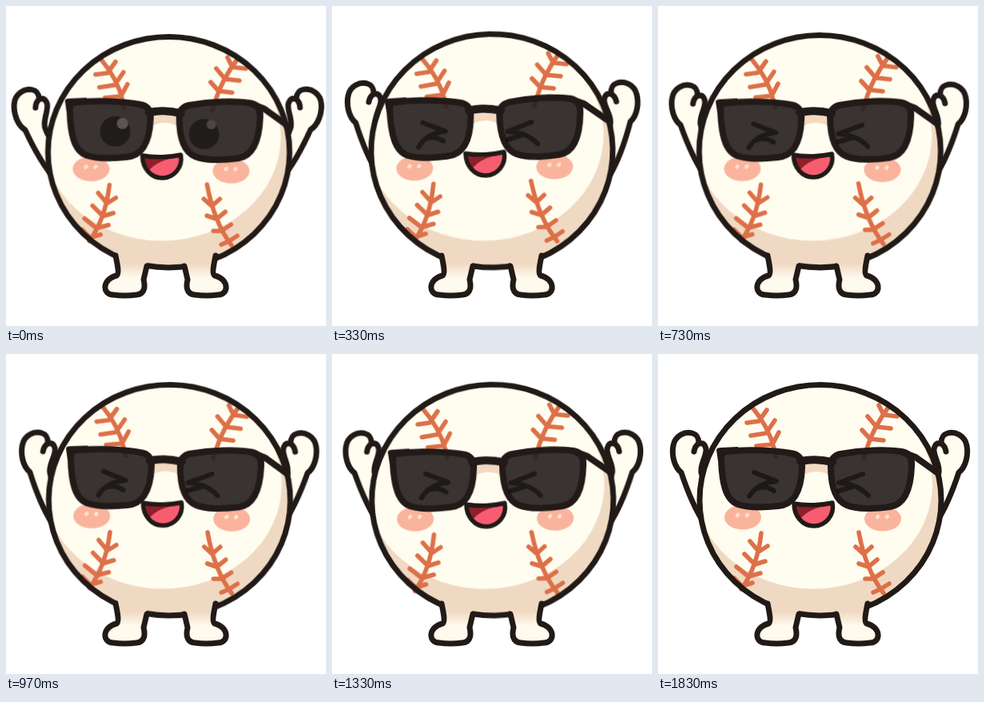
Animation of 400x400 px, one loop 1.86 s. Source, as an HTML page:

```html
<!DOCTYPE html>
<html lang="en">
<head>
<meta charset="utf-8">
<title>Baseball cheer</title>
<style>
  html, body { margin: 0; width: 100%; height: 100%; overflow: hidden; background: #fff; }
  svg { display: block; width: 100%; height: 100%; }

  .ink { stroke: #211a17; stroke-width: 7; stroke-linecap: round; stroke-linejoin: round; }
  .line { fill: none; }
  .skin { fill: #fffcf0; }
  .seam { fill: none; stroke: #dd7049; stroke-width: 5.6; stroke-linecap: round; stroke-linejoin: round; }
  .lens { fill: rgba(38, 31, 30, .91); stroke: #211a18; stroke-width: 8; stroke-linejoin: round; }
  .frame { fill: #211a18; }
  .rod { fill: none; stroke: #211a18; stroke-linejoin: round; stroke-linecap: round; }
  .squint { fill: none; stroke: #000; stroke-width: 6; stroke-linecap: round; stroke-linejoin: round; }

  .move { animation: 1860ms ease-in-out infinite; }
  .head { transform-origin: 200px 320px; animation-name: sway; }
  .ball { transform-origin: 200px 327px; animation-name: stretch; }
  .face { animation-name: bob; }
  .shades { transform-origin: 200px 155px; animation-name: slip; }
  .arm { transform-origin: 60px 195px; }
  .left { animation-name: wave-left; }
  .right { animation-name: wave-right; }
  .open { animation-name: open; animation-timing-function: step-end; }
  .shut { animation-name: shut; animation-timing-function: step-end; }

  /* two sways per loop */
  @keyframes sway {
    0% { transform: rotate(.2deg); }
    25.3% { transform: rotate(-1.6deg); }
    50% { transform: rotate(.6deg); }
    75% { transform: rotate(-1deg); }
    98.4%, 100% { transform: rotate(0deg); }
  }
  /* four bounces per loop, dying down */
  @keyframes stretch {
    0% { transform: scaleY(1); }
    11% { transform: scaleY(1.025); }
    25% { transform: scaleY(.997); }
    37.5% { transform: scaleY(1.007); }
    50% { transform: scaleY(1); }
    62.5% { transform: scaleY(1.005); }
    75% { transform: scaleY(1); }
    87.5% { transform: scaleY(1.002); }
    100% { transform: scaleY(1); }
  }
  @keyframes bob {
    0% { transform: translateY(0); }
    11% { transform: translateY(-8px); }
    25% { transform: translateY(2px); }
    37.5% { transform: translateY(-1px); }
    50% { transform: translateY(-.5px); }
    62.5% { transform: translateY(-1.5px); }
    75% { transform: translateY(1px); }
    87.5% { transform: translateY(-.5px); }
    100% { transform: translateY(0); }
  }
  @keyframes slip {
    0% { transform: translate(0, -1px); }
    11% { transform: translate(-5px, -1px) scaleY(1.02); }
    25%, 100% { transform: none; }
  }
  @keyframes wave-left {
    0% { transform: translateY(3px) rotate(-6.5deg); }
    11% { transform: translateY(-3px) rotate(4.2deg); }
    26% { transform: rotate(-4deg); }
    50% { transform: rotate(1deg); }
    80% { transform: rotate(-1.5deg); }
    100% { transform: rotate(0deg); }
  }
  @keyframes wave-right {
    0% { transform: translateY(3px) rotate(-6deg); }
    11% { transform: translateY(-3px) rotate(6.5deg); }
    26% { transform: rotate(-.5deg); }
    38% { transform: rotate(1deg); }
    50% { transform: rotate(-1.2deg); }
    73% { transform: rotate(.8deg); }
    100% { transform: rotate(0deg); }
  }
  @keyframes open { 0% { opacity: 1; } 5.4%, 100% { opacity: 0; } }
  @keyframes shut { 0% { opacity: 0; } 5.4%, 100% { opacity: 1; } }
</style>
</head>
<body>
<svg viewBox="0 0 400 400">
  <defs>
    <clipPath id="round"><ellipse cx="203" cy="182.7" rx="151" ry="144.2"/></clipPath>
    <linearGradient id="calf" gradientUnits="userSpaceOnUse" x1="0" y1="306" x2="0" y2="346">
      <stop offset=".4" stop-color="#f0d9c2"/>
      <stop offset=".85" stop-color="#fffaee"/>
    </linearGradient>
    <g id="arm">
      <path class="ink skin" d="M58 212C48 197 37 172 29 148C20 141 17 126 19 115C21 102 34 96 43 99C50 101 51 106 51 112C58 110 62 117 59 126C57 134 53 140 54 148C56 158 60 166 66 172"/>
      <path class="ink line" d="M51 112Q46 115 45 122"/>
    </g>
    <g id="leg">
      <path fill="url(#calf)" d="M140 306V318C140 327 142 335 138 337C121 341 119 360 134 361Q148 363 163 361C174 360 174 350 172 342L176 322V306Z"/>
      <path class="ink line" d="M137 312C139 322 142 335 138 337C121 341 119 360 134 361Q148 363 163 361C174 360 174 350 172 342L176 325"/>
    </g>
    <g id="cheek">
      <ellipse rx="23" ry="15.5" fill="#fab49d"/>
      <path d="M-6-3l-1 1M6-3l-1 1" stroke="#ffe3d3" stroke-width="4.5" stroke-linecap="round"/>
    </g>
  </defs>

  <use href="#arm" class="move arm left"/>
  <g transform="matrix(-1 0 0 1 405 0)"><use href="#arm" class="move arm right"/></g>

  <g class="move head">
    <g class="move ball">
      <g clip-path="url(#round)">
        <rect x="40" y="30" width="330" height="300" fill="#f0d9c2"/>
        <ellipse cx="194" cy="163" rx="149" ry="130.5" fill="#fffdf0"/>
      </g>
    </g>

    <g class="move face">
      <g class="seam">
        <path d="M118 67C129 80 140 98 145 118L147 128M111 86L126 84L136 70M116 102L135 99L146 83M123 115L143 113L151 98"/>
        <path d="M289 65C278 80 267 98 261 118L257 130M276 64L282 76L299 78M262 78L273 91L291 93M255 95L265 106L282 108"/>
        <path d="M129 224C126 250 118 275 104 294M115 234L126 247L137 240M108 250L121 263L134 259M98 266L113 278L128 274M95 280L105 290L118 286"/>
        <path d="M251 223C256 250 266 278 282 299M247 241L257 250L267 241M251 262L263 266L274 257M259 281L269 281L281 273M269 298L278 294L289 287"/>
      </g>
      <use href="#cheek" x="106" y="204"/>
      <use href="#cheek" x="281" y="206"/>
      <path d="M170 187C185 190 205 189 218 186C221 202 209 215 195 215C180 215 170 202 170 187Z" fill="#8f1f2b"/>
      <path d="M178 206C186 196 199 191 217 189C218 203 208 215 195 215Q184 214 178 206Z" fill="#f75d71"/>
      <path class="ink line" style="stroke-width:5.5" d="M170 187C185 190 205 189 218 186C221 202 209 215 195 215C180 215 170 202 170 187Z"/>
    </g>

    <g class="move ball">
      <ellipse class="ink line" cx="203" cy="182.7" rx="151" ry="144.2"/>
    </g>

    <g class="move face">
      <g class="move shades">
        <path d="M182 138H214V151Q198 143 182 151Z" fill="#f3d9c0"/>
        <path class="lens" d="M84 122C110 119 145 120 166 124Q181 126 180 142C179 172 170 188 150 190C132 192 112 192 100 188C84 182 80 160 79 132Q79 123 84 122Z"/>
        <path class="lens" d="M228 125C255 120 285 119 304 122Q318 124 317 140C316 170 308 188 290 191C270 194 248 194 236 189C219 182 216 160 216 140Q216 128 228 125Z"/>
        <path class="frame" d="M73 120Q73 117 79 117L100 116V124L82 126V140L75 134Z"/>
        <path class="rod" stroke-width="10" d="M178 134Q197 130 218 135"/>
        <path class="rod" stroke-width="8" d="M304 122L322 129L350 149"/>
        <g class="move open" opacity="0">
          <g opacity=".45">
            <circle cx="136" cy="158" r="19"/>
            <circle cx="247" cy="161" r="19"/>
          </g>
          <circle cx="145" cy="148" r="7" fill="#5d5553"/>
          <circle cx="256" cy="149" r="6" fill="#4c4443"/>
        </g>
        <g class="move shut">
          <g class="squint" opacity=".5">
            <path d="M120 148L148 159Q124 161 114 178M124 168Q134 164 145 171"/>
            <path d="M256 150L226 161Q249 162 263 177M226 171L243 166"/>
          </g>
        </g>
      </g>
    </g>
  </g>

  <use href="#leg"/>
  <use href="#leg" transform="matrix(-1 0 0 1 399 0)"/>
</svg>
</body>
</html>
```
